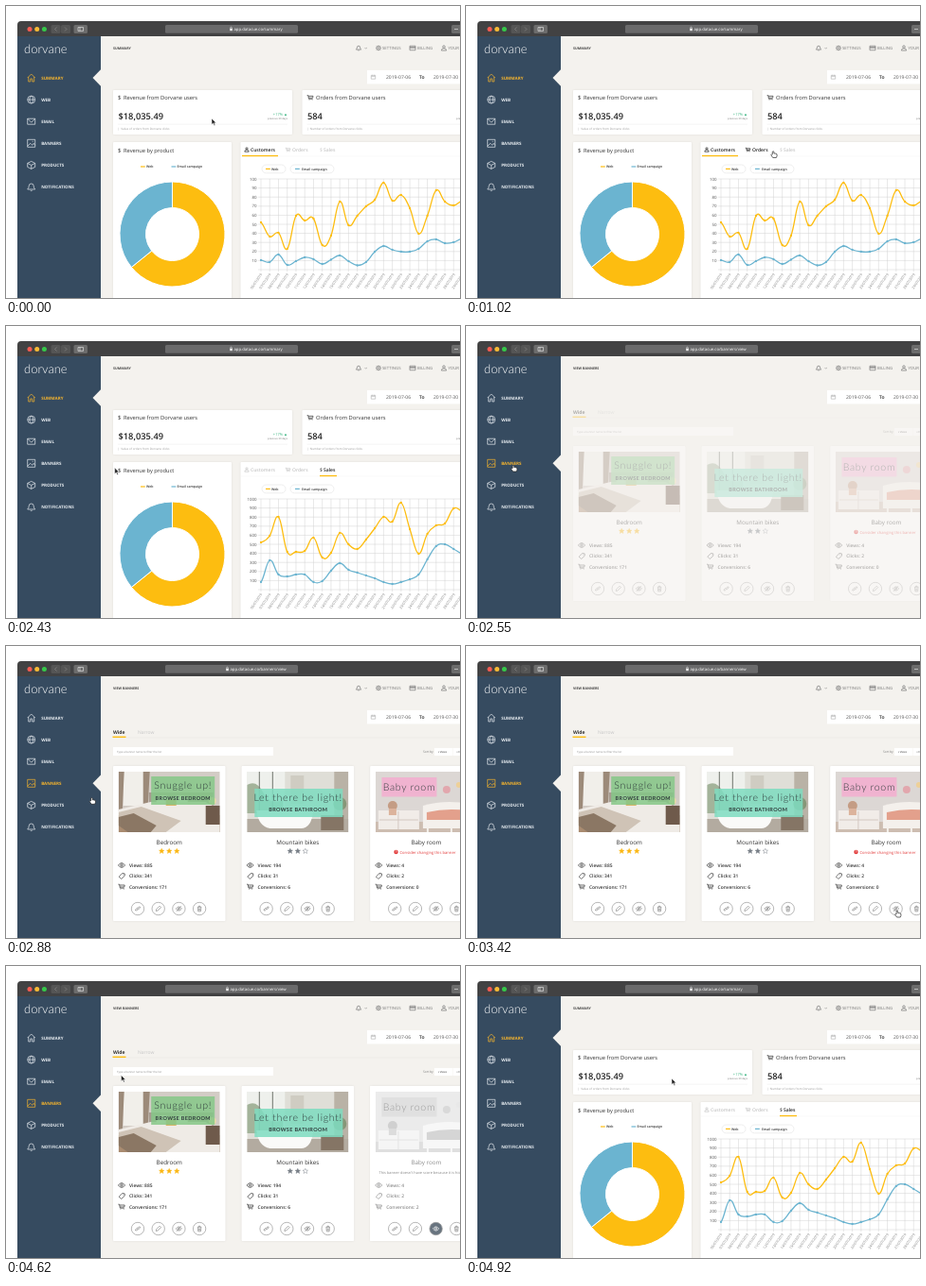
An HTML page for the animation above (4950 ms loop, 479 px wide and 309 px high).

```html
<!DOCTYPE html>
<html lang="en">
<head>
<meta charset="utf-8">
<title>Dashboard tour</title>
<style>
  html, body { margin: 0; width: 100%; height: 100%; overflow: hidden; background: #fff; }
  svg { display: block; width: 479px; height: 309px; font-family: "Open Sans", sans-serif; text-rendering: geometricPrecision; }
  .card { fill: #fff; filter: drop-shadow(0 .5px 1.2px #00000014); }
  .light { font-family: Lato, sans-serif; font-weight: 300; }
</style>
</head>
<body>
<svg id="stage" viewBox="0 0 479 309" xmlns="http://www.w3.org/2000/svg"></svg>
<script>
const LOOP = 4950, STEP = 30;
const YELLOW = '#fdbd10', BLUE = '#6bb4d0', INK = '#333', GREY = '#777', PALE = '#c6c6c6', PAGE = '#f4f2ee';

const ICONS = {
  home: 'M-4 0L0-4L4 0M-3-1V4H-1V1H1V4H3V-1',
  globe: 'M-4 0a4 4 0 1 0 8 0a4 4 0 1 0-8 0M-4 0H4M0-4C-2.5-2-2.5 2 0 4C2.5 2 2.5-2 0-4',
  mail: 'M-4-3H4V3H-4ZL0 1L4-3',
  image: 'M-4-4H4V4H-4ZM-4 3L-1 0L1 2L2.5 0L4 2M1-2h1',
  box: 'M-4-2L0-4L4-2V2L0 4L-4 2ZL0 0L4-2M0 0V4',
  bell: 'M-4 2.5Q-2.5 1-2.5-1A2.5 2.5 0 0 1 2.5-1Q2.5 1 4 2.5ZM-1 3.7Q0 4.6 1 3.7',
  gear: 'M-3 0a3 3 0 1 0 6 0a3 3 0 1 0-6 0M-1 0a1 1 0 1 0 2 0a1 1 0 1 0-2 0M0-4v1M0 3v1M-4 0h1M3 0h1M-3-3l1 1M3 3l-1-1M3-3l-1 1M-3 3l1-1',
  pay: 'M-4-3H4V3H-4ZM-4-1H4M-4-.4H4',
  user: 'M-2-2a2 2 0 1 0 4 0a2 2 0 1 0-4 0M-4 4Q-4 1-1 .5H1Q4 1 4 4Z',
  cart: 'M-4.5-3H-3L-2 2H3.5M-2.8-2H4L3.5 .5H-2.2M-1.6 3.6h.6M2.4 3.6h.6',
  calendar: 'M-4-3H4V4H-4ZM-4-1H4M-2-4v2M2-4v2',
  eye: 'M-4.5 0Q0-6 4.5 0Q0 6-4.5 0ZM-1.5 0a1.5 1.5 0 1 0 3 0a1.5 1.5 0 1 0-3 0',
  hidden: 'M-4.5 0Q0-6 4.5 0Q0 6-4.5 0ZM-1.5 0a1.5 1.5 0 1 0 3 0a1.5 1.5 0 1 0-3 0M-3.5 4L3.5-4',
  tag: 'M-3.5 1L1-3.5L4-3V0L-.5 4ZM1.5-1.5h.6',
  link: 'M-.5 1.5L-2 3Q-4 3.5-3.5 1.2L-1-1Q.5-1.6 1 0M.5-1.5L2-3Q4-3.5 3.5-1.2L1 1Q-.5 1.6-1 0',
  pencil: 'M-3.5 3.5L-3 1L2-4L4-2L-1 3Z',
  trash: 'M-3-2.5H3M-2.5-2.5L-2 4H2L2.5-2.5M-1-2.5V-4H1V-2.5M-.7-.5v3M.7-.5v3'
};

const text = (x, y, s, size, fill = INK, attrs = '') =>
  `<text x="${x}" y="${y}" font-size="${size}" fill="${fill}" ${attrs}>${s}</text>`;
const rect = (x, y, w, h, fill, attrs = '') =>
  `<rect x="${x}" y="${y}" width="${w}" height="${h}" fill="${fill}" ${attrs}/>`;
const card = (x, y, w, h) => rect(x, y, w, h, '#fff', 'rx="1" class="card"');
const circle = (x, y, r, fill, attrs = '') => `<circle cx="${x}" cy="${y}" r="${r}" fill="${fill}" ${attrs}/>`;
const path = (d, attrs) => `<path d="${d}" ${attrs}/>`;
const icon = (name, x, y, scale = 1, color = GREY) =>
  path(ICONS[name], `transform="translate(${x} ${y}) scale(${scale})" fill="none" stroke="${color}" stroke-width="${.7 / scale}" stroke-linejoin="round"`);
const BOLD = 'font-weight="700"', SEMI = 'font-weight="600"', MID = 'text-anchor="middle"';

// Window frame and sidebar
const MENU = [['SUMMARY', 'home'], ['WEB', 'globe'], ['EMAIL', 'mail'],
              ['BANNERS', 'image'], ['PRODUCTS', 'box'], ['NOTIFICATIONS', 'bell']];
const rowY = i => 76 + 23.1 * i;

function windowFrame() {
  const button = (x, w, fill) => rect(x, 20, w, 9, fill, 'rx="1.5"');
  return rect(12, 32, 467, 277, PAGE) +
    path('M12 32V20Q12 16 16 16H479V32Z', 'fill="#424243"') +
    ['#f95b52', '#f8bb35', '#35c84a'].map((c, i) => circle(25 + 7.7 * i, 24.5, 2.5, c)).join('') +
    button(47.5, 10, '#555') + button(58, 10, '#555') + button(71.5, 14.5, '#6c6c6c') + button(470, 12, '#6c6c6c') +
    path('M53.5 22.5l-2 2l2 2M62 22.5l2 2l-2 2', 'fill="none" stroke="#888" stroke-width=".7"') +
    path('M76 22.5h5.5v4h-5.5ZM78 22.5v4M477 24.5h-4', 'fill="none" stroke="#ddd" stroke-width=".7"') +
    rect(168, 20, 140, 8.8, '#6a6a6b', 'rx="1.5"') +
    `<g id="lock">${rect(-1.3, 23.8, 2.6, 2.4, '#eee')}${path('M-.8 24v-1a.8.8 0 0 1 1.6 0v1', 'fill="none" stroke="#eee" stroke-width=".5"')}</g>` +
    text(266, 26.1, '', 4.3, '#fff', `${MID} id="url"`) +
    rect(12, 32, 88, 277, '#364b60') +
    text(19, 50, 'dorvane', 13, '#fff', 'class="light"') +
    MENU.map(([label, name], i) => `<g class="menu">${icon(name, 26.7, rowY(i), 1, 'currentColor')}` +
      text(37.2, rowY(i) + 1.7, label, 4.5, 'currentColor', BOLD) + '</g>').join('') +
    path('M100.2-9L91.5 0L100.2 9Z', `id="notch" fill="${PAGE}"`) +
    text(113, 46, '', 3.65, '#444', `${BOLD} id="heading"`) +
    icon('bell', 372, 44.5, .65) + path('M378.5 44l1.2 1.2l1.2-1.2', 'fill="none" stroke="#777" stroke-width=".5"') +
    icon('gear', 393, 44.5, .7) + text(397, 46.2, 'SETTINGS', 4.3, GREY) +
    icon('pay', 429, 44.5, .75) + text(434, 46.2, 'BILLING', 4.3, GREY) +
    icon('user', 462, 44.5, .65) + text(466.5, 46.2, 'YOUR ACCOUNT', 4.3, GREY) +
    rect(381, 68, 100, 14.5, '#fff') +
    icon('calendar', 387.5, 75, .55, '#bbb') + text(401, 77, '2019-07-06', 5, '#555') +
    text(436, 77, 'To', 5, INK, SEMI) + text(451, 77, '2019-07-30', 5, '#555');
}

// Summary page
const legend = (x, y, color, label, gap = 6) =>
  path(`M${x} ${y}h4.8`, `stroke="${color}" stroke-width="1.2"`) + text(x + gap, y + 1.2, label, 3.5, INK, SEMI);

function donut(cx, cy, outer, inner) {
  const at = (r, deg) => {
    const a = deg * Math.PI / 180;
    return `${cx + r * Math.sin(a)} ${cy - r * Math.cos(a)}`;
  };
  const slice = (from, to, color) => {
    const large = +(to - from > 180);
    return path(`M${at(outer, from)}A${outer} ${outer} 0 ${large} 1 ${at(outer, to)}` +
      `L${at(inner, to)}A${inner} ${inner} 0 ${large} 0 ${at(inner, from)}Z`,
      `fill="${color}" stroke="#fff" stroke-width="1"`);
  };
  return slice(0, 231, YELLOW) + slice(231, 360, BLUE);
}

const plotX = i => 269 + 9.24 * i;
const TABS = [['Customers', 258, 249, 38], ['Orders', 302, 293, 27], ['Sales', 335, 331, 18]];

function chartFrame() {
  let labels = '', grid = '';
  for (let i = 0; i <= 10; i++) {
    const y = 183 + 9.6 * i;
    grid += `M266 ${y}H479`;
    if (i < 10) labels += text(264.5, y + 1.6, '', 4.4, '#555', 'text-anchor="end" class="tick"');
  }
  for (let i = 0; i < 25; i++) {
    const x = plotX(i), day = String(6 + i).padStart(2, '0');
    grid += `M${x} 183V281`;
    labels += text(0, 0, day + '/07/2019', 3.6, GREY, `text-anchor="end" transform="translate(${x + 1.5} 284) rotate(-56)"`);
  }
  return path(grid, 'stroke="#d0d0d0" stroke-width=".5"') + labels +
    [BLUE, YELLOW].map(c => path('', `class="line" fill="none" stroke="${c}" stroke-width="1.3"`) +
      path('', `class="dots" stroke="${c}" stroke-width="2.3" stroke-linecap="round"`)).join('');
}

function summaryPage() {
  const stat = (x, titleX, w, title, value, note) => card(x, 89, w, 47) +
    text(titleX, 98.8, title, 5.75) + text(x + 5.5, 120, value, 9.3, '#222', SEMI) +
    rect(x + 5, 124.8, w - 10, .5, '#e9e9e9') + text(x + 5, 130.8, '|&#160; ' + note, 3.1, '#999');
  const growth = x => text(x, 115.7, '+17% ▲', 4, '#36b37e', 'text-anchor="end"') +
    text(x, 120.3, 'previous 30 days', 2.7, GREY, 'text-anchor="end"');
  const tabIcons = [icon('user', 254, 152, .55, 'currentColor'), icon('cart', 297.5, 152, .6, 'currentColor'),
                    text(331, 154, '$', 5, 'currentColor')];
  return stat(113, 124, 189, 'Revenue from Dorvane users', '$18,035.49', 'Value of orders from Dorvane clicks') +
    text(118, 98.8, '$', 6) + growth(297) +
    stat(312.5, 327, 189, 'Orders from Dorvane users', '584', 'Number of orders from Dorvane clicks') +
    icon('cart', 321, 96.8, .75, INK) + growth(496) +
    card(113, 144, 125, 172) + text(118, 154.7, '$', 6) + text(124, 154.7, 'Revenue by product', 5.75) +
    legend(142, 170, YELLOW, 'Web') + legend(174.5, 170, BLUE, 'Email campaign') +
    donut(175.5, 241.5, 55.5, 28) +
    card(247.5, 144, 245, 172) + rect(247.5, 158.8, 232, .4, '#eee') +
    TABS.map(([label, x], i) => `<g class="tab">${tabIcons[i]}${text(x, 154, label, 5, 'currentColor', SEMI)}</g>`).join('') +
    rect(0, 157.9, 0, 1.3, YELLOW, 'id="underline"') +
    [[270, 25], [300, 46]].map(([x, w]) => rect(x, 168, w, 8.8, '#fff', 'rx="4.4" stroke="#e2e2e2" stroke-width=".6"')).join('') +
    legend(274, 172.4, YELLOW, 'Web') + legend(305, 172.4, BLUE, 'Email campaign', 7) + chartFrame();
}

// Banners page; each photo is drawn in a 107 by 64 box
const PHOTOS = [
  rect(0, 0, 107, 64, '#d3ccc5') + rect(5, 0, 22, 36, '#f1efea') + path('M0 0H6L4 42H0ZM26 0H33L31 36H26Z', 'fill="#9c8a79"') +
    path('M32 22H100V38H32Z', 'fill="#a79b90"') + rect(0, 46, 107, 18, '#a98b70') +
    path('M0 40L34 32H92L107 40V64H28L0 54Z', 'fill="#efebe6"') + path('M0 43L24 37L66 52L50 64H22L0 54Z', 'fill="#cfc3b6"') +
    path('M0 48L16 44L40 57L34 64H10L0 57Z', 'fill="#8b7764"') +
    path('M40 27q8-4 14 0v8H40ZM58 27q8-4 15 0v8H58Z', 'fill="#fbf8f3"') + path('M50 30q6-3 11 0v6H50Z', 'fill="#d6b566"') +
    rect(92, 36, 15, 20, '#6f5a4b') + circle(99, 31, 4, '#f0dcaa'),
  rect(0, 0, 107, 64, '#dfded7') + rect(0, 0, 40, 44, '#eef0ec') + path('M0 14Q10 8 17 22T38 30V44H0Z', 'fill="#a3b39a"') +
    path('M13 0V44M27 0V44', 'stroke="#6d736c"') + rect(46, 4, 14, 30, '#cfccc2') + rect(92, 0, 15, 64, '#b9b2a6') +
    rect(0, 50, 107, 14, '#b3aba0') + path('M10 41H70Q68 60 57 60H24Q12 58 10 41Z', 'fill="#fafaf8"') +
    rect(78, 46, 24, 16, '#857565') + circle(98, 34, 7, '#879678'),
  rect(0, 0, 107, 64, '#dcd7d4') + rect(0, 53, 107, 11, '#cdbdb1') + rect(3, 41, 43, 20, '#f1ece8') +
    path('M4 51H45M24 42V61', 'stroke="#d3c8c1"') + circle(18, 36, 5, '#c49c84') + rect(14, 39, 8, 7, '#dcb39c') +
    path('M50 36Q78 28 107 36V60H50Z', 'fill="#f4f0ec"') + path('M54 43Q80 37 107 43V51H54Z', 'fill="#e3a08c"') +
    path('M55 58V64M80 58V64', 'stroke="#f4f0ec" stroke-width="2"') +
    circle(75, 19, 4, '#e2a7ad') + circle(88, 14, 3, '#eed098')
];
const BANNERS = [
  { title: 'Bedroom', stats: [885, 341, 171], stars: [3, '#fbb714'], plate: [34.5, 5, 67, 30, '#86c889'],
    copy: [['Snuggle up!', 68, 18, 10.6], ['BROWSE BEDROOM', 68, 30, 5.5]] },
  { title: 'Mountain bikes', stats: [194, 31, 6], stars: [2, '#777e86'], plate: [8, 18, 93, 30, '#7fdcc0'],
    copy: [['Let there be light!', 54, 31, 10.6], ['BROWSE BATHROOM', 54, 42.3, 5.5]] },
  { title: 'Baby room', stats: [4, 2, 0], plate: [6.5, 6, 58, 20.5, '#f4aed0'], copy: [['Baby room', 35.5, 19.5, 10.6]] }
];
const star = (x, fill, stroke) =>
  path('M0-3L.9-1L3-.9L1.4.5L2 2.7L0 1.5L-2 2.7L-1.4.5L-3-.9L-.9-1Z',
    `transform="translate(${x} 217) scale(.9)" fill="${fill}" stroke="${stroke}" stroke-width=".5"`);

function banner(index, off = false) {
  const { title, stats, stars, plate, copy } = BANNERS[index];
  const left = 113 + 135.6 * index, mid = left + 59.2;
  const ink = off ? '#8c8c8c' : INK, counts = off ? [4, 2, 2] : stats;
  const [px, py, pw, ph, plateColor] = plate;
  const art = PHOTOS[index] + rect(px, py, pw, ph, plateColor, 'opacity=".86"') +
    copy.map(([s, x, y, size], i) => text(x, y, s, size, '#2f3b3b',
      i ? `${MID} ${BOLD} letter-spacing=".35" font-family="Lato, sans-serif"` : `${MID} class="light" letter-spacing=".7"`)).join('');
  let status;
  if (off) status = text(393.5, 219.5, "This banner doesn't have score because it is hidden", 3.9, '#888');
  else if (stars) status = [-8, 0, 8].map((dx, i) => star(mid + dx, i < stars[0] ? stars[1] : '#fff', stars[1])).join('');
  else status = circle(411.5, 218, 2.2, '#e23b3b') + text(411.5, 219.3, '?', 3.5, '#fff', MID + ' ' + BOLD) +
    text(415.5, 219.6, 'Consider changing this banner', 4.15, '#e23b3b');
  const lines = ['Views', 'Clicks', 'Conversions'].map((label, i) =>
    icon(['eye', 'tag', 'cart'][i], left + 9, 232 + 11.3 * i, .8, ink) +
    text(left + 17, 234 + 11.3 * i, `${label}: ${counts[i]}`, 4.9, ink, SEMI)).join('');
  const buttons = ['link', 'pencil', 'hidden', 'trash'].map((name, i) => {
    const x = left + 26 + 21.7 * i, on = off && i === 2;
    return circle(x, 278, 6.7, on ? '#68747f' : '#fff', 'stroke="#999" stroke-width=".7"') +
      icon(on ? 'eye' : name, x, 278, .7, on ? '#fff' : '#888');
  }).join('');
  return (off ? rect(left, 127, 118.5, 164, '#fff') : card(left, 127, 118.5, 164)) +
    `<svg x="${left + 5.7}" y="133" width="107" height="64" ${off ? 'style="filter:grayscale(1);opacity:.5"' : ''}>${art}</svg>` +
    text(mid, 209.8, title, 6.25, ink, MID) + status + lines + buttons;
}

function bannersPage() {
  return text(113, 92.5, 'Wide', 5, INK, BOLD) + text(139, 92.5, 'Narrow', 5, PALE) +
    rect(113, 96.8, 366, .4, '#e4e0da') + rect(112.5, 95.6, 14, 1.4, YELLOW) +
    rect(113, 107, 169, 9, '#fff') +
    text(117, 112.5, 'Type a banner name to filter the list', 2.85, '#888') +
    text(440, 113.3, 'Sort by', 3.3, GREY) +
    [[452, 'Views'], [471.5, 'Clicks']].map(([x, s]) => rect(x, 108, 19, 8, '#fff') + text(x + 4, 113, '▪ ' + s, 2.8)).join('') +
    banner(0) + banner(1) + banner(2) + `<g id="hiddenCard">${banner(2, true)}</g>`;
}

const stage = document.getElementById('stage');
stage.innerHTML = windowFrame() +
  `<g id="summary">${summaryPage()}</g><g id="banners">${bannersPage()}</g><g id="cursor">` +
  path('M0 0V6.5L1.6 5.1L2.7 7.5L3.8 7L2.7 4.7H4.7Z', 'id="arrow" fill="#222" stroke="#fff" stroke-width=".5"') +
  path('M-1 4V.6Q0-.6.9.6V2.8Q3 2.5 4.6 3.8V6L3.8 8H-.5L-2.7 4.7Q-2.3 3.5-1 4Z',
    'id="hand" transform="translate(0 -.8) scale(.85)" fill="#fff" stroke="#222" stroke-width=".8"') + '</g>';

const $ = id => document.getElementById(id), all = name => [...document.querySelectorAll('.' + name)];
const menuItems = all('menu'), tabs = all('tab'), ticks = all('tick'), lines = all('line'), dots = all('dots');

// Heights in stage pixels per day: [email, web]
const CUSTOMERS = [
  [269, 271, 263, 274, 270, 266, 268, 273, 268.5, 264, 270, 274.5, 271, 260, 254, 258, 260, 260, 257, 249, 247, 251, 250, 246],
  [229, 244, 240, 257, 222, 227, 225, 253, 243, 207, 232, 222, 212, 205, 187, 206, 200, 214, 241, 222, 195, 207, 211, 206]];
const SALES = [
  [271, 248, 263, 265, 263, 263, 271, 270, 259, 251, 258, 261, 264, 267, 271, 273, 271, 268, 263, 247, 233, 231, 236, 241],
  [229, 222, 202, 239, 239, 238, 224, 245, 240, 219, 231, 236, 226, 214, 202, 207, 187, 215, 241, 220, 211, 209, 193, 196]];

const clamp = v => Math.max(0, Math.min(1, v));
const mix = (a, b, k) => a + (b - a) * k;

function spline(ys) {
  const at = i => ys[Math.max(0, Math.min(ys.length - 1, i))];
  let d = `M${plotX(0)} ${ys[0]}`;
  for (let i = 0; i < ys.length - 1; i++) {
    const c1 = ys[i] + (at(i + 1) - at(i - 1)) / 5, c2 = ys[i + 1] - (at(i + 2) - ys[i]) / 5;
    d += `C${plotX(i + .4)} ${c1} ${plotX(i + .6)} ${c2} ${plotX(i + 1)} ${ys[i + 1]}`;
  }
  return d;
}

// Straight pointer moves: start, end, destination. The first two steps show as one.
const MOVES = [[-30, 480, 301, 151], [690, 1260, 341, 157], [2010, 2550, 50, 148],
               [2820, 3420, 455, 281], [4200, 4710, 50, 80], [4740, 4920, 217, 119]];
function pointer(t) {
  let x = 217, y = 119;
  for (const [start, end, toX, toY] of MOVES) {
    if (t < start + 2 * STEP) break;
    const k = clamp((t - start) / (end - start));
    x = mix(x, toX, k);
    y = mix(y, toY, k);
  }
  return [x, y];
}
const HAND_SPANS = [[390, 2070], [2520, 2910], [3390, 4260], [4650, 4800]];

function draw(t) {
  const onBanners = t >= 2520 && t < 4650, active = onBanners ? 3 : 0;
  $('url').textContent = 'app.datacue.co/' + (onBanners ? 'banners/view' : 'summary');
  $('lock').setAttribute('transform', `translate(${onBanners ? 233.5 : 237.5} 0)`);
  $('heading').textContent = onBanners ? 'VIEW BANNERS' : 'SUMMARY';
  $('notch').setAttribute('transform', `translate(0 ${rowY(active)})`);
  menuItems.forEach((g, i) => g.style.color = i === active ? '#f8b62d' : '#e8edf1');

  $('banners').style.display = onBanners ? '' : 'none';
  $('summary').style.display = onBanners ? 'none' : '';
  $('banners').style.opacity = clamp((t - 2508) / 120);
  $('summary').style.opacity = t < 4650 ? 1 : clamp((t - 4620) / 120);
  $('hiddenCard').style.opacity = clamp((t - 3720) / 90);

  const tab = t < 1290 ? 0 : 2;
  const hover = t < 390 || t >= 2070 ? -1 : t < 1140 ? 1 : 2;
  tabs.forEach((g, i) => g.style.color = i === tab || i === hover ? '#222' : PALE);
  $('underline').setAttribute('x', TABS[tab][2]);
  $('underline').setAttribute('width', TABS[tab][3]);
  const morph = clamp((t - 1230) / 150);
  ticks.forEach((el, i) => el.textContent = (10 - i) * (morph ? 100 : 10));
  lines.forEach((line, n) => {
    const ys = CUSTOMERS[n].map((y, i) => mix(y, SALES[n][i], morph));
    line.setAttribute('d', spline(ys));
    dots[n].setAttribute('d', ys.map((y, i) => `M${plotX(i)} ${y}h.01`).join(''));
  });

  const hand = HAND_SPANS.some(([a, b]) => t >= a && t < b);
  $('hand').style.display = hand ? '' : 'none';
  $('arrow').style.display = hand ? 'none' : '';
  $('cursor').setAttribute('transform', `translate(${pointer(t)})`);
}

const origin = performance.now();
function frame() {
  const t = (performance.now() - origin) % LOOP;
  draw(Math.floor(t / STEP) * STEP);
  requestAnimationFrame(frame);
}
frame();
</script>
</body>
</html>
```
